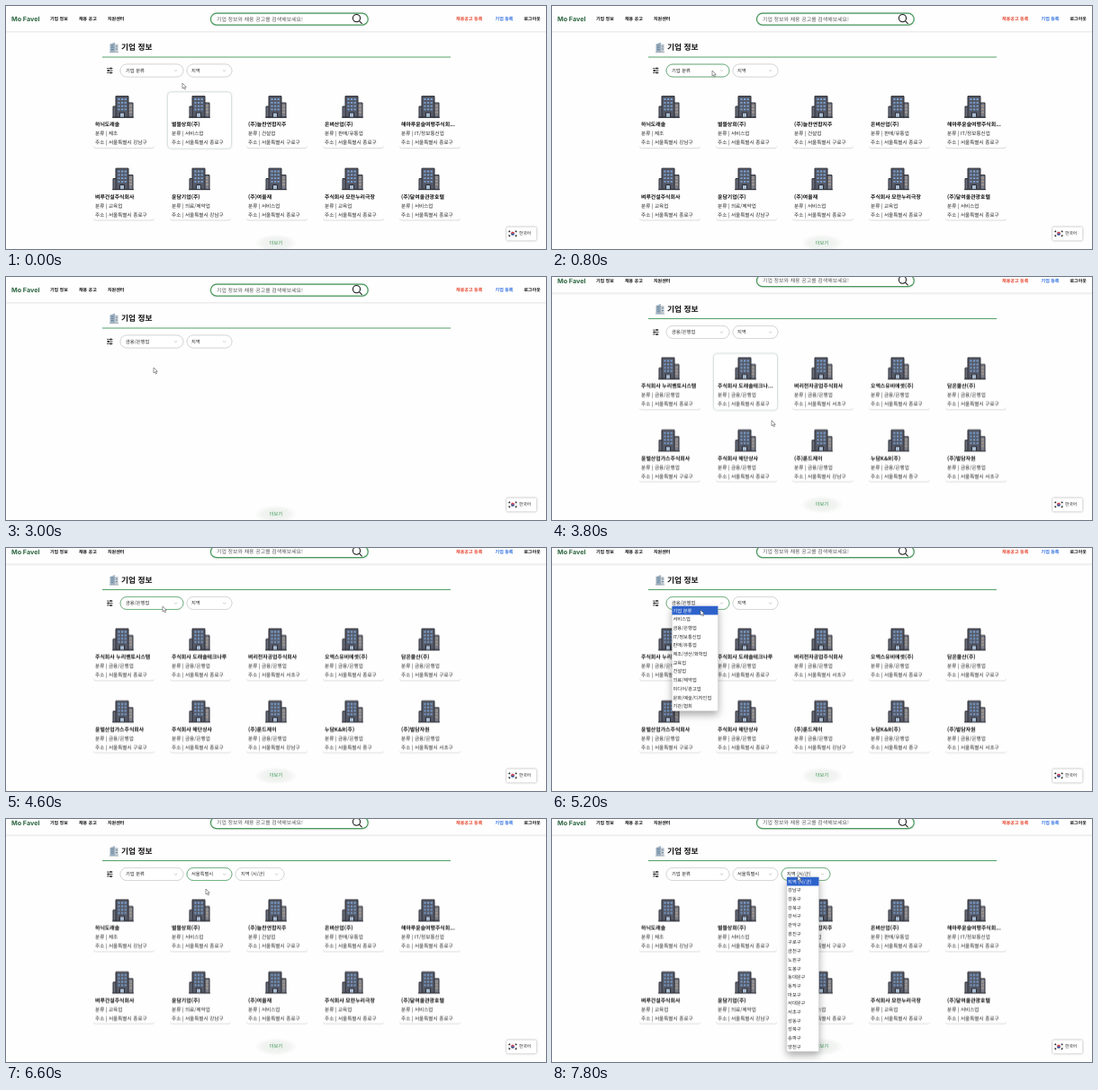
Recreate the animation shown at these times as an HTML page. Size 600 by 271 pixels, loop 8 s.

```html
<!DOCTYPE html>
<html lang="ko">
<head>
<meta charset="utf-8">
<title>기업 정보</title>
<style>
html, body { margin: 0; width: 100%; height: 100%; overflow: hidden; background: #fefefe; }
svg { display: block; width: 100%; height: 100%; }
text { font-family: "Noto Sans CJK KR", "Noto Sans CJK", "Noto Sans", sans-serif; fill: #222; text-rendering: geometricPrecision; white-space: pre; }
.bold { font-weight: 700; fill: #111; }
.medium { font-weight: 500; }
.brand { font-family: Inter, sans-serif; font-weight: 700; fill: #2c6640; }
.hint { fill: #5c5c5c; }
.red { fill: #e8452f; }
.blue { fill: #2f6fe0; }
.green { fill: #43985a; }
.white { fill: #fff; }
.card { fill: #fefefe; filter: drop-shadow(0 1.1px .4px #0002); }
.hover { fill: #fff; stroke: #c6d8ca; stroke-width: .6; filter: drop-shadow(0 .8px .8px #0002); }
.field { fill: #fff; stroke: #cfd2d0; stroke-width: .7; filter: drop-shadow(0 .7px .7px #0003); }
.focus { fill: none; stroke: #6bb27d; stroke-width: .9; }
.menu { fill: #fff; stroke: #ccc; stroke-width: .4; filter: drop-shadow(0 4px 4px #0005); }
.badge { fill: #fff; filter: drop-shadow(0 .8px .9px #0006); }
.line { fill: none; stroke: #222; stroke-width: .8; }
.timed { animation: 8s step-end infinite; }
#page { animation: scroll 8s step-end infinite; }
#cursor { animation: point 8s steps(1) infinite; }
.loaded { animation: load 8s step-end infinite; }
@keyframes scroll {
  0% { transform: none; }
  45%, to { transform: translateY(-10.5px); }
}
@keyframes load {
  0% { opacity: 1; }
  37.5% { opacity: 0; animation-timing-function: steps(3); }
  45% { opacity: 1; }
  67.5% { opacity: 0; animation-timing-function: steps(3); }
  75%, to { opacity: 1; }
}
@keyframes point {
  0% { transform: translate(196px, 86px); animation-timing-function: steps(3); }
  7.5% { transform: translate(178px, 72px); }
  12.5% { transform: translate(178px, 74px); animation-timing-function: steps(3); }
  20% { transform: translate(167px, 99px); animation-timing-function: steps(3); }
  27.5% { transform: translate(164px, 101px); }
  37.5% { transform: translate(164px, 101px); animation-timing-function: steps(4); }
  47.5% { transform: translate(244px, 160px); animation-timing-function: steps(4); }
  57.5% { transform: translate(174px, 65px); }
  60% { transform: translate(174px, 65px); animation-timing-function: steps(2); }
  65% { transform: translate(165px, 69px); animation-timing-function: steps(3); }
  72.5% { transform: translate(218px, 65px); }
  75% { transform: translate(218px, 65px); animation-timing-function: steps(2); }
  80% { transform: translate(222px, 78px); }
  85% { transform: translate(222px, 78px); animation-timing-function: steps(3); }
  92.5%, to { transform: translate(273px, 63px); }
}
</style>
</head>
<body>
<svg id="stage" viewBox="0 0 600 271" preserveAspectRatio="none">
  <defs>
    <linearGradient id="fade" x2="0" y2="1">
      <stop stop-color="#000" stop-opacity=".09"/><stop offset="1" stop-color="#000" stop-opacity="0"/>
    </linearGradient>
    <radialGradient id="glow">
      <stop stop-color="#e9efea"/><stop offset=".65" stop-color="#f2f4f2"/><stop offset="1" stop-color="#fefefe"/>
    </radialGradient>
    <g id="tower" stroke="#2b2d36" stroke-width="1">
      <path d="M-11 12H-7V24H-11z" fill="#6d717c"/>
      <path d="M5 8H11V24H5z" fill="#7d808a"/>
      <path d="M-8 .6H6V24H-8z" fill="#565a67"/>
      <path d="M-5.6 4H4M-5.6 7.8H4M-5.6 11.6H4M-5.6 15.4H4" stroke="#7ba3d6" stroke-width="1.8" stroke-dasharray="2.2 1.4"/>
      <path d="M7.2 11.5H9.8M7.2 15H9.8M7.2 18.5H9.8" stroke="#c9ad92" stroke-width="1.3" stroke-dasharray="1 .6"/>
      <path d="M-3.5 24V19H1.5V24" fill="#a9bcd2"/>
      <path d="M-12 24.2H12"/>
    </g>
  </defs>
  <g id="page"></g>
  <g id="fixed"></g>
  <path id="cursor" d="M0 0V6L1.4 4.8L2.4 7L3.5 6.5L2.5 4.4H4.3z" fill="#fff" stroke="#555" stroke-width=".6"/>
</svg>
<script>
const PERIOD = 8000;
const rules = document.head.appendChild(document.createElement('style')).sheet;
let tracks = 0;

// Shows content between alternating on/off times in ms.
function during(content, ...toggles) {
  const name = 'show' + tracks++;
  const frames = toggles.map((ms, i) =>
    `${ms / PERIOD * 100}% { visibility: ${i % 2 ? 'hidden' : 'visible'}; }`);
  rules.insertRule(`@keyframes ${name} { 0% { visibility: hidden; } ${frames.join(' ')} }`);
  return `<g class="timed" style="animation-name:${name}">${content}</g>`;
}

const escape = s => s.replace(/&/g, '&amp;');
const text = (x, middle, size, value, style = '') =>
  `<text x="${x}" y="${middle + size * .36}" font-size="${size}" class="${style}">${escape(value)}</text>`;
const box = (x, y, w, h, r, style) =>
  `<rect x="${x}" y="${y}" width="${w}" height="${h}" rx="${r}" class="${style}"/>`;

function card(i, [name, kind, district], style = 'card') {
  const x = 99 + i % 5 * 85, y = 96 + Math.floor(i / 5) * 80.5;
  const frame = style === 'hover' ? box(x - 4.5, y, 71, 63, 4, style) : box(x - 2, y + 3, 68, 59, 3, style);
  return frame + `<use href="#tower" x="${x + 31}" y="${y + 4}"/>` +
    text(x, y + 36.3, 5.9, name, 'bold') +
    text(x, y + 46.3, 5.6, '분류 | ' + kind) +
    text(x, y + 56.2, 5.6, `주소 | 서울특별시 ${district}`);
}
const cards = list => list.map((entry, i) => card(i, entry)).join('');

const field = (x, w) => box(x, 65, w, 14, 7, 'field') +
  `<path d="M${x + w - 10} 71.3l1.6 1.5l1.6-1.5" class="line" style="stroke:#aaa;stroke-width:.6"/>`;
const focus = (x, w) => box(x, 65, w, 14, 7, 'focus');
const label = (x, value) => text(x, 72, 5.25, value);

// picks: [item index, ...toggle times] for each highlighted row
function menu(x, w, items, picks) {
  const pitch = 9.7, top = 75.3;
  const row = (i, style) => text(x + 1.1, top + (i + .5) * pitch, 5.25, items[i], style);
  const marks = picks.map(([i, ...toggles]) =>
    during(`<rect x="${x}" y="${top + i * pitch}" width="${w}" height="${pitch}" fill="#2d62cb"/>` + row(i, 'white'), ...toggles));
  return box(x, top, w, items.length * pitch + .5, 1.5, 'menu') + items.map((_, i) => row(i)).join('') + marks.join('');
}

const everyone = [
  ['하늬도래솔', '제조', '강남구'],
  ['별뜰상회(주)', '서비스업', '종로구'],
  ['(주)늘찬연합지주', '건설업', '구로구'],
  ['온벼산업(주)', '판매/유통업', '종로구'],
  ['해마루윤슬여행주식회...', 'IT/정보통신업', '종로구'],
  ['벼루건설주식회사', '교육업', '종로구'],
  ['윤담기업(주)', '의료/제약업', '강남구'],
  ['(주)여울재', '서비스업', '종로구'],
  ['주식회사 모란누리극장', '교육업', '종로구'],
  ['(주)달여울관광호텔', '서비스업', '종로구']
];
const FINANCE = '금융/은행업';
const finance = [
  ['주식회사 누리벤토시스템', '종로구'],
  ['주식회사 도래솔테크나루', '종로구'],
  ['벼리전자공업주식회사', '서초구'],
  ['오엑스유비에셋(주)', '종로구'],
  ['담온물산(주)', '구로구'],
  ['윤벌산업가스주식회사', '구로구'],
  ['주식회사 해단상사', '종로구'],
  ['(주)룬드제이', '강남구'],
  ['누담K&R(주)', '중구'],
  ['(주)벌담자원', '서초구']
].map(([name, district]) => [name, FINANCE, district]);

const kinds = ['기업 분류', '서비스업', FINANCE, 'IT/정보통신업', '판매/유통업', '제조/생산/화학업',
  '교육업', '건설업', '의료/제약업', '미디어/광고업', '문화/예술/디자인업', '기관/협회'];
const regions = ['지역', '서울특별시', '부산광역시', '대구광역시', '인천광역시', '광주광역시', '대전광역시',
  '울산광역시', '세종특별자치시', '경기도', '강원도', '충청북도', '충청남도', '전라북도', '전라남도',
  '경상북도', '경상남도', '제주특별자치도'];
const districts = ['지역 (시/군)', ...('강남 강동 강북 강서 관악 광진 구로 금천 노원 도봉 동대문 동작 ' +
  '마포 서대문 서초 성동 성북 송파 양천').split(' ').map(d => d + '구')];

const header =
  '<rect y="28" width="600" height="2.5" fill="url(#fade)"/>' +
  text(6, 14.5, 7.2, 'Mo Favel', 'brand') +
  text(49, 14.5, 5, '기업 정보', 'bold') + text(81, 14.5, 5, '채용 공고', 'bold') + text(113, 14.5, 5, '지원센터', 'bold') +
  '<rect x="227.5" y="8.2" width="174.7" height="13" rx="6.5" fill="#fff" stroke="#479a5b" stroke-width="1.2" style="filter:drop-shadow(0 .8px .8px #0003)"/>' +
  text(234, 14.5, 5.95, '기업 정보와 채용 공고를 검색해보세요!', 'hint') +
  '<g class="line" style="stroke-width:1.1"><circle cx="389.5" cy="13.6" r="4.1"/><path d="M392.5 16.6L395.7 19.8"/></g>' +
  text(500, 14.5, 5.05, '채용공고 등록', 'red bold') + text(543.5, 14.5, 5.05, '기업 등록', 'blue bold') +
  text(575.5, 14.5, 5, '로그아웃', 'bold');

const heading =
  '<path d="M115.5 42.5l5.5-2V51.5h-5.5z" fill="#9fb2c2"/><path d="M121 42.5h3.6V51.5h-3.6z" fill="#c2cad0"/>' +
  '<path d="M116.6 44h3.2M116.6 46.3h3.2M116.6 48.6h3.2M122 45h1.8M122 48h1.8" stroke="#607b92" stroke-width=".9"/>' +
  '<path d="M114.8 51.7h10.4" stroke="#85919b" stroke-width=".6"/>' +
  text(128, 46.3, 8.75, '기업 정보', 'bold') +
  '<path d="M107 57H494" stroke="#52a066" stroke-width="1.2"/>';

const filters =
  '<g class="line"><path d="M112 69.6h6.5M112 72h6.5M112 74.4h6.5"/></g>' +
  '<g fill="#222"><circle cx="116.6" cy="69.6" r="1"/><circle cx="113.8" cy="72" r="1"/><circle cx="116.6" cy="74.4" r="1"/></g>' +
  field(127, 70) + field(201, 50) +
  during(field(255, 54) + label(261, districts[0]), 6600) +
  during(label(133, kinds[0]), 0, 2200, 5400) + during(label(133, FINANCE), 2200, 5400) +
  during(label(206, regions[0]), 0, 6600) + during(label(206, regions[1]), 6600) +
  during(focus(127, 70), 600, 2400, 4400, 5600) +
  during(focus(201, 50), 5600, 6800) +
  during(focus(255, 54), 7200);

const results = '<g class="loaded">' +
  during(cards(everyone), 0, 2400, 5400) +
  during(cards(finance), 3000, 5400) +
  during(card(1, everyone[1], 'hover'), 0, 400) +
  during(card(1, ['주식회사 도래솔테크나...', FINANCE, '종로구'], 'hover'), 3200, 4000) + '</g>';

const more = '<ellipse cx="300" cy="264.5" rx="24" ry="10" fill="url(#glow)"/>' + text(292.7, 264, 5.3, '더보기', 'green medium');

const menus =
  during(menu(133.4, 51, kinds, [[0, 1000, 1200, 5000, 5400], [1, 1200, 1400], [2, 1400, 2200, 4800, 5000]]), 1000, 2200, 4800, 5400) +
  during(menu(206, 50, regions, [[0, 6000, 6200], [1, 6200, 6600]]), 6000, 6600) +
  during(menu(261, 35.5, districts, [[0, 7400]]), 7400);

document.getElementById('page').innerHTML = header + heading + filters + results + more + menus;

document.getElementById('fixed').innerHTML =
  box(556.2, 246.6, 33.2, 14.8, 1.5, 'badge') +
  '<rect x="558" y="250.3" width="10" height="7" fill="#f4f4f4"/>' +
  '<path d="M561 253.8a2 2 0 0 1 4 0z" fill="#d23a45"/><path d="M561 253.8a2 2 0 0 0 4 0z" fill="#2a4a94"/>' +
  '<path d="M558.6 252l1.4-1.3M566 250.7l1.4 1.3M558.6 255.6l1.4 1.3M566 256.9l1.4-1.3" stroke="#222" stroke-width="1.3"/>' +
  text(570, 253.7, 4.8, '한국어', 'medium');
</script>
</body>
</html>
```
